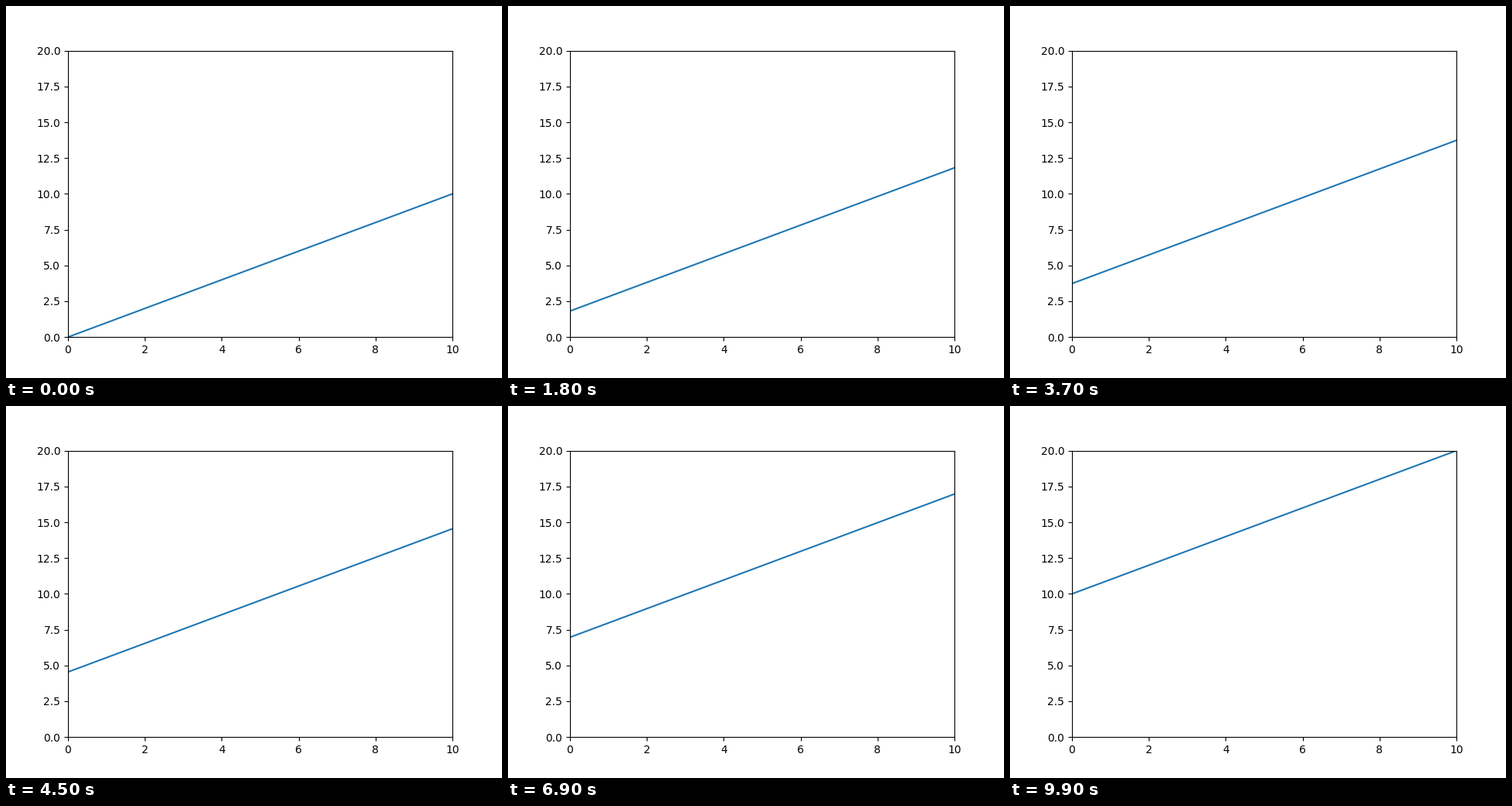
Recreate the animation shown at these times as a matplotlib script. Size 640 by 480 pixels, loop 10000 ms.

```python
import numpy as np
import matplotlib.pyplot as plt
from matplotlib.animation import FuncAnimation

FRAMES = 100

fig, ax = plt.subplots(figsize=(6.4, 4.8), dpi=100)
ax.set_xlim(0, 10)
ax.set_ylim(0, 20)

x = np.linspace(0, 10, 100)
offsets = np.linspace(0, 10, FRAMES)
line, = ax.plot(x, x)


def update(i):
    line.set_ydata(x + offsets[i])
    return line,


anim = FuncAnimation(fig, update, frames=FRAMES, interval=100,
                     repeat=True, repeat_delay=0)
plt.show()
```
